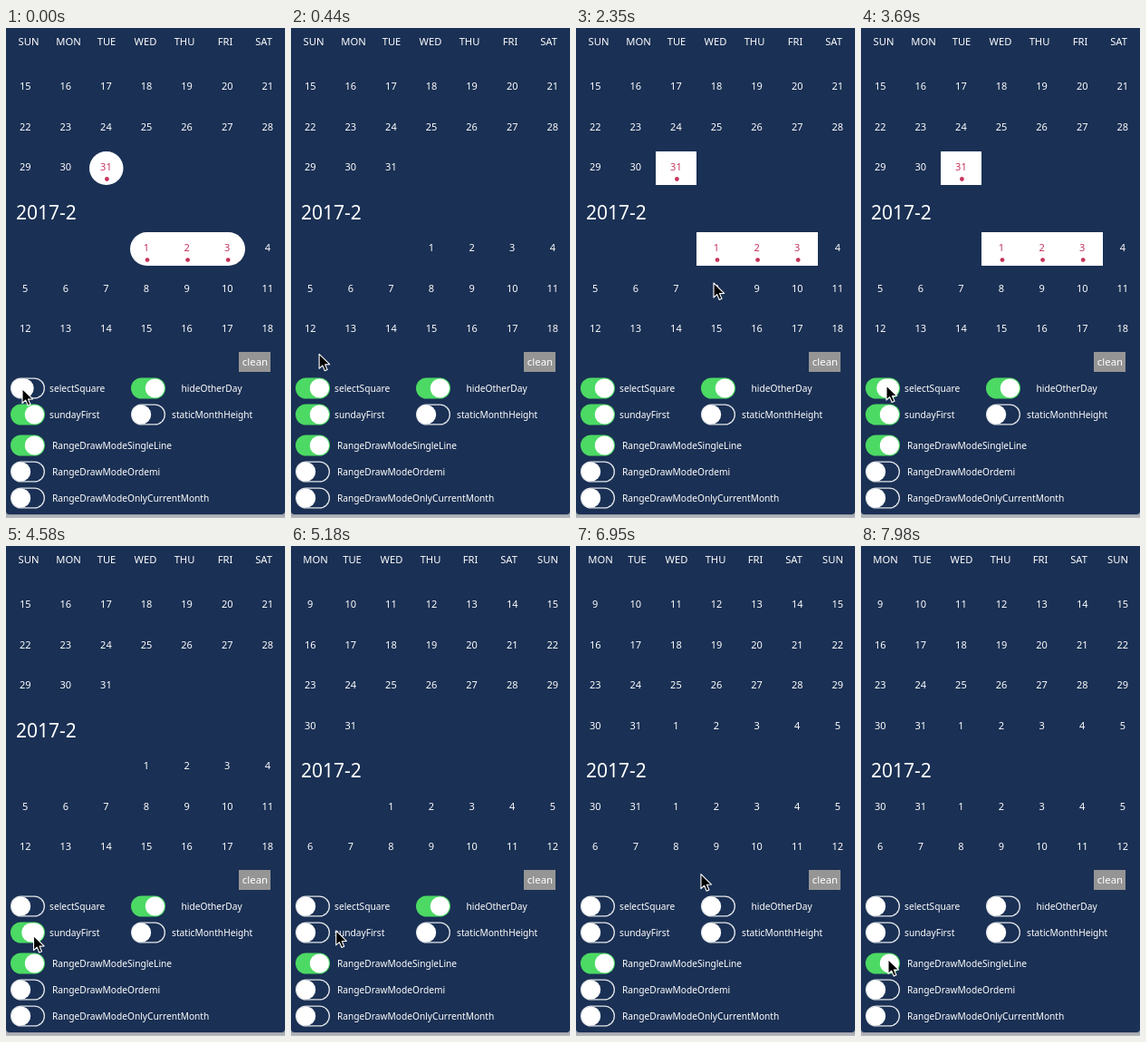
Animation of 308x540 px, one loop 8 s. Source, as an HTML page:

```html
<!DOCTYPE html>
<html lang="en">
<head>
<meta charset="utf-8">
<title>Calendar options</title>
<style>
  html, body { margin: 0; width: 100%; height: 100%; overflow: hidden; background: #a9adb3; }
  svg { display: block; width: 100vw; height: 100vh; }
  text { font-family: "Noto Sans", "Open Sans", sans-serif; fill: #fff; }
  .mid { text-anchor: middle; }
  .week { font-size: 11.2px; }
  .day { font-size: 11px; }
  .month { font-size: 21px; font-weight: 300; }
  .label { font-size: 10.2px; }
  .button { font-size: 11.4px; }
  .red { fill: #c5345b; }
</style>
</head>
<body>
<svg id="stage" viewBox="0 0 308 540" xmlns="http://www.w3.org/2000/svg">
  <defs>
    <linearGradient id="shade" x1="0" y1="0" x2="0" y2="1">
      <stop offset="0" stop-color="#7d828b"/>
      <stop offset="1" stop-color="#b9bcc1"/>
    </linearGradient>
  </defs>
  <rect y="530" width="308" height="10" fill="url(#shade)"/>
  <rect y="-10" width="308" height="546" rx="4" fill="#1a3054"/>
  <g id="calendar"></g>
  <rect x="257" y="357" width="35" height="22" fill="#959595"/>
  <text class="mid button" x="275" y="372">clean</text>
  <g id="switches"></g>
  <path id="cursor" d="M0 0V16L3.7 12.6L6.2 18.5L9 17.3L6.5 11.6L11.6 11.4Z"
    fill="#000" stroke="#fff" stroke-width="1.1" stroke-linejoin="round"/>
</svg>
<script>
const LOOP = 8000, TICK = 147.5, LEAD = 14;
const NAVY = '#1a3054';
const byId = id => document.getElementById(id);
const calendar = byId('calendar'), switches = byId('switches'), cursor = byId('cursor');

const clamp = v => Math.max(0, Math.min(1, v));
const smooth = v => v * v * (3 - 2 * v);
const mix = (a, b, k) => a + (b - a) * k;

// Keys are [tick, ...values]
function track(keys, tick, ease = v => v) {
  if (tick <= keys[0][0]) return keys[0].slice(1);
  for (let i = 1; i < keys.length; i++) {
    const a = keys[i - 1], b = keys[i];
    if (tick <= b[0]) {
      const k = ease((tick - a[0]) / (b[0] - a[0]));
      return a.slice(1).map((v, j) => mix(v, b[j + 1], k));
    }
  }
  return keys[keys.length - 1].slice(1);
}

const pointer = [
  [2, 18, 397.5], [6, 102, 153], [7, 100, 152], [8, 144, 179],
  [11, 240, 240.5], [14, 240, 240.5], [15, 214, 251], [16, 152, 281],
  [18, 68, 360], [20, 28, 394], [27, 28, 394], [29, 30.5, 429.5],
  [34, 30.5, 429.5], [38, 153.5, 394], [43, 153.5, 394], [46, 150, 352],
  [51, 34, 445], [54, 30, 455.5]
];

const OFF = [[0, 0]], ON = [[0, 1]];
const options = [
  { x: 5, y: 397, tx: 48, name: 'selectSquare', press: [0, 25],
    keys: [[0, 0], [1, .4], [2, .9], [3, 1], [25, 1], [26, .5], [27, .15], [28, 0]] },
  { x: 138, y: 397, tx: 193.5, name: 'hideOtherDay', press: [39],
    keys: [[39, 1], [40, .2], [41, .05], [42, 0]] },
  { x: 5, y: 426, tx: 48, name: 'sundayFirst', press: [31],
    keys: [[31, 1], [32, .5], [33, .15], [34, 0]] },
  { x: 138, y: 426, tx: 183, name: 'staticMonthHeight', keys: OFF },
  { x: 5, y: 460, tx: 51, name: 'RangeDrawModeSingleLine', keys: ON },
  { x: 5, y: 489, tx: 51, name: 'RangeDrawModeOrdemi', keys: OFF },
  { x: 5, y: 518, tx: 51, name: 'RangeDrawModeOnlyCurrentMonth', keys: OFF }
];

const weeks = {
  sun: [['SUN', 25], ['MON', 69], ['TUE', 111], ['WED', 154], ['THU', 197], ['FRI', 242], ['SAT', 284.5]],
  mon: [['MON', 27], ['TUE', 67.5], ['WED', 111], ['THU', 154], ['FRI', 198], ['SAT', 240.5], ['SUN', 283.5]]
};

const colX = c => 21.2 + c * 44.6;
const rowY = r => 64 + r * 44.55;

const text = (x, y, cls, s) => `<text x="${x}" y="${y}" class="${cls}">${s}</text>`;
const pill = (x, y, w, h, rx, fill) =>
  `<rect x="${x}" y="${y}" width="${w}" height="${h}" rx="${rx}" fill="${fill}"/>`;

function week(row, first, isFeb, hide, picked) {
  let out = '';
  for (let c = 0; c < 7; c++) {
    const d = first + c;
    const other = isFeb ? d < 1 : d > 31;
    if (other && hide) continue;
    const n = d < 1 ? d + 31 : d > 31 ? d - 31 : d;
    const hit = !other && picked(d, isFeb);
    out += text(colX(c), rowY(row) + 4, 'mid day' + (hit ? ' red' : ''), n);
    if (hit) out += `<circle cx="${colX(c) + 1}" cy="${rowY(row) + 13.4}" r="2.4" class="red"/>`;
  }
  return out;
}

function drawCalendar(tick) {
  const sunday = tick < 33, hide = tick < 40;
  const round = tick < 2;
  const hasDay = round || (tick >= 7 && tick < 27);
  const hasRange = round || (tick >= 13 && tick < 27);
  const picked = (d, feb) => feb ? hasRange && d <= 3 : hasDay && d === 31;
  const row = (r, first, feb) => week(r, first, feb, hide, picked);

  let out = weeks[sunday ? 'sun' : 'mon'].map(([s, x]) => text(x, 18.7, 'mid week', s)).join('');
  if (hasDay) out += round ? pill(92, 136, 37.5, 37, 18.5, '#fff') : pill(88, 136, 45, 37, 0, '#fff');
  if (hasRange) out += round ? pill(137, 225, 127, 37, 18.5, '#fff') : pill(133, 225, 134, 37, 0, '#fff');
  out += text(11, sunday ? 210.6 : 255, 'month', '2017-2');
  out += sunday
    ? row(0, 15) + row(1, 22) + row(2, 29) + row(4, -2, true) + row(5, 5, true) + row(6, 12, true)
    : row(0, 9) + row(1, 16) + row(2, 23) + row(3, 30) + row(5, -1, true) + row(6, 6, true);
  calendar.innerHTML = out;
}

function drawSwitch(o, tick) {
  const [p] = track(o.keys, tick);
  const pressed = (o.press || []).some(t => tick === t || tick === t + 1);
  const green = clamp((p - .3) / .5);
  const rgb = [[226, 76], [229, 217], [233, 100]].map(([a, b]) => Math.round(mix(a, b, green)));
  const hole = 1 - p, w = 35.4 * hole, h = 20.6 * hole;
  const knobW = 21.2 + (pressed ? 3.5 : 0);
  const slide = smooth(clamp((p - .25) / .75));
  const knobX = mix(o.x + 1, o.x + 37 - knobW, slide);
  return pill(o.x, o.y - 11.6, 38, 23.2, 11.6, `rgb(${rgb})`)
    + pill(o.x + 19 - w / 2, o.y - h / 2, w, h, h / 2, NAVY)
    + pill(knobX, o.y - 10.6, knobW, 21.2, 10.6, '#fff')
    + text(o.tx, o.y + 4, 'label', o.name);
}

let last = -1;
function frame(now) {
  const tick = Math.floor((now % LOOP + LEAD) / TICK);
  if (tick !== last) {
    last = tick;
    drawCalendar(tick);
    switches.innerHTML = options.map(o => drawSwitch(o, tick)).join('');
    const [x, y] = track(pointer, tick, smooth);
    cursor.setAttribute('transform', `translate(${x} ${y})`);
  }
  requestAnimationFrame(frame);
}
frame(0);
</script>
</body>
</html>
```
